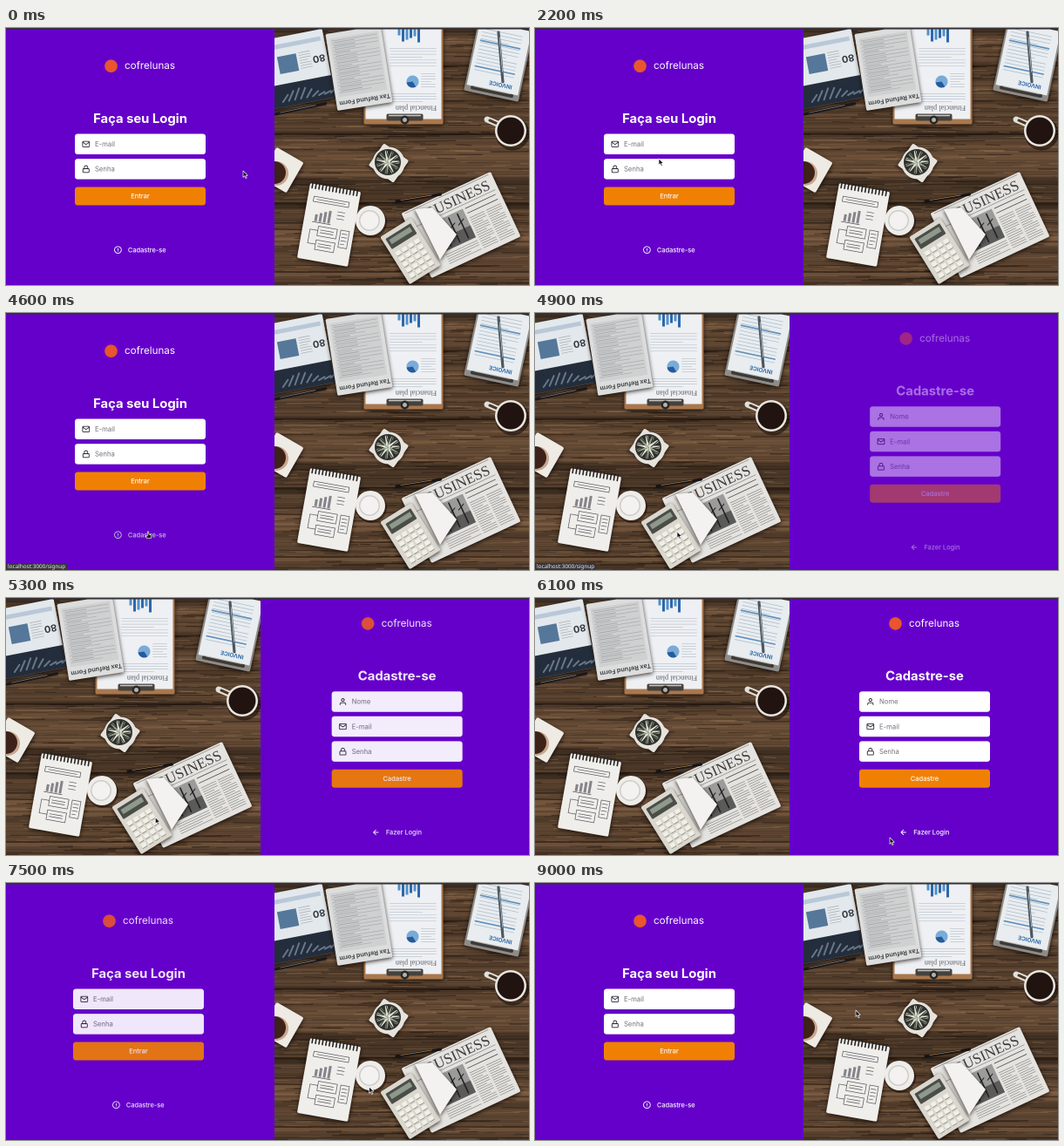
An HTML page with a canvas for the animation above (9200 ms loop, 600 px wide and 295 px high).

```html
<!DOCTYPE html>
<html lang="pt-BR">
<head>
<meta charset="utf-8">
<title>Login</title>
<style>
  html, body { margin: 0; width: 100%; height: 100%; overflow: hidden; background: #6500ca; }
  canvas { display: block; width: 100vw; height: 100vh; }
</style>
</head>
<body>
<canvas id="stage"></canvas>
<script>
const W = 600, H = 295, LOOP = 9200, STEP = 100;
const PURPLE = '#6500ca', ORANGE = '#f08003', INK = '#55545a', GREY = '#a9adb1';
const BRAND = 'cofrelunas';
const SIGNUP_AT = 4632, LOGIN_AT = 6865;
const SANS = 'Inter, "Open Sans", sans-serif';
const SERIF = '"Liberation Serif", serif';
const scale = Math.max(2, window.devicePixelRatio || 1);

function prepare(canvas) {
  canvas.width = W * scale;
  canvas.height = H * scale;
  const c = canvas.getContext('2d');
  c.scale(scale, scale);
  c.lineJoin = c.lineCap = 'round';
  return c;
}

function layer(draw) {
  const canvas = document.createElement('canvas');
  draw(prepare(canvas));
  return canvas;
}

// Drawing helpers
function line(c, x0, y0, x1, y1, color, width = .7) {
  c.beginPath();
  c.moveTo(x0, y0);
  c.lineTo(x1, y1);
  c.strokeStyle = color;
  c.lineWidth = width;
  c.stroke();
}

function disc(c, x, y, r, fill) {
  c.beginPath();
  c.arc(x, y, r, 0, 7);
  c.fillStyle = fill;
  c.fill();
}

function box(c, x, y, w, h, r, fill) {
  c.beginPath();
  c.roundRect(x, y, w, h, r);
  c.fillStyle = fill;
  c.fill();
}

function text(c, str, x, y, font, fill, align = 'left') {
  c.font = font;
  c.fillStyle = fill;
  c.textAlign = align;
  c.fillText(str, x, y);
}

function at(c, x, y, deg, draw) {
  c.save();
  c.translate(x, y);
  c.rotate(deg * Math.PI / 180);
  draw();
  c.restore();
}

function shadow(c) {
  c.shadowColor = 'rgba(15,8,4,.8)';
  c.shadowBlur = 5 * scale;
  c.shadowOffsetY = 1.5 * scale;
}

// A tilted card; its content is drawn from the top left corner
function card(c, x, y, w, h, deg, fill, draw) {
  at(c, x, y, deg, () => {
    c.translate(-w / 2, -h / 2);
    c.save();
    shadow(c);
    box(c, 0, 0, w, h, 2, fill);
    c.restore();
    draw();
  });
}

function rows(c, x, y, w, n, gap, color = GREY) {
  for (let i = 0; i < n; i++) line(c, x, y + i * gap, x + w * (i % 4 === 3 ? .7 : 1), y + i * gap, color);
}

function flipped(c, str, x, y, font, color) {
  at(c, x, y, 180, () => text(c, str, 0, 2, font, color, 'center'));
}

function pen(c, x, y, length, deg, color, shine) {
  at(c, x, y, deg, () => {
    line(c, 0, 0, length, 0, color, 3.2);
    line(c, length * .1, -.6, length * .8, -.6, shine);
  });
}

function random(seed) {
  return () => (seed = seed * 16807 % 2147483647) / 2147483647;
}

// Desk picture, laid out for the right half of the stage
function wood(c) {
  const rnd = random(77);
  let tone = 26;
  for (let y = 0; y < H; y++) {
    tone += (26 + 4 * Math.sin(y / 17) - tone) * .2 + (rnd() - .5) * 8;
    c.fillStyle = `hsl(27 31% ${tone}%)`;
    c.fillRect(308, y, 294, 1.5);
  }
  for (let i = 0; i < 650; i++) {
    const x = 290 + rnd() * 310, y = rnd() * H;
    const color = rnd() < .55 ? 'rgba(28,17,11,.45)' : 'rgba(172,132,94,.3)';
    line(c, x, y, x + 10 + rnd() * 55, y + rnd() * 2 - 1, color, .4 + rnd());
  }
  for (let y = 43; y < H; y += 79) line(c, 308, y, 602, y, 'rgba(24,14,9,.7)', 1.3);
}

function papers(c) {
  card(c, 330, 48, 82, 80, -11, '#e3e8ec', () => {
    box(c, 0, 54, 82, 26, 1, '#242d3b');
    for (let x = 22; x < 80; x += 7) line(c, x, 74, x + 7, 67 + 5 * Math.sin(x), '#66788a', 2);
    box(c, 22, 8, 56, 5, 0, '#b9c8d8');
    box(c, 25, 22, 22, 20, 0, '#55779a');
    rows(c, 50, 22, 13, 7, 3);
    flipped(c, '80', 72, 31, `700 11px ${SANS}`, '#343b45');
  });
  pen(c, 309, 99, 59, -12, '#18191c', '#868483');

  card(c, 456, 54, 91, 113, 0, '#a9774d', () => {
    box(c, 2, 0, 87, 107, 0, '#eef0f3');
    for (let i = 0; i < 6; i++) box(c, 39 + i * 4.5, 2, 3, 9 + i * 7 % 9, 0, i % 2 ? '#2e68ac' : '#5390ca');
    rows(c, 30, 26, 53, 7, 3.3, '#bfc8d1');
    rows(c, 66, 55, 16, 6, 3, '#bfc8d1');
    disc(c, 56, 64, 7, '#79abd9');
    c.beginPath();
    c.moveTo(56, 64);
    c.arc(56, 64, 7, 1, 3);
    c.fillStyle = '#255b9c';
    c.fill();
    rows(c, 30, 78, 53, 4, 3, '#bfc8d1');
    flipped(c, 'Financial plan', 60, 94, `8.3px ${SERIF}`, '#555960');
    box(c, 26, 101, 42, 8, 2, '#45423e');
    line(c, 29, 103, 65, 103, '#c9c7c1', 1.4);
    disc(c, 47, 108, 5, '#292827');
    disc(c, 47, 108, 2.5, '#b5b2aa');
  });

  card(c, 405, 46, 64, 89, -9, '#dcdddc', () => {
    box(c, 4, 6, 56, 68, 0, '#cfd0d0');
    rows(c, 6, 9, 52, 16, 4);
    rows(c, 8, 11, 24, 15, 4, '#96999b');
    flipped(c, 'Tax Refund Form', 33, 81, `700 7.2px ${SANS}`, '#46494c');
  });

  card(c, 565, 38, 64, 82, 12, '#8f8c88', () => {
    box(c, 2, 0, 60, 75, 0, '#e9edf0');
    rows(c, 7, 8, 46, 13, 4, '#aab9c8');
    for (const y of [22, 52]) line(c, 7, y, 53, y, '#5e8fbc', 1.6);
    flipped(c, 'INVOICE', 40, 67, `700 6.5px ${SANS}`, '#316ca8');
    line(c, 9, 77, 55, 77, '#3c3a38', 4);
    line(c, 11, 75, 53, 75, '#b5b3ae', 1);
  });
  pen(c, 565, 5, 57, 85, '#4c5861', '#c8d1d6');
}

function crockery(c) {
  line(c, 552, 105, 564, 110, '#e2dfd9', 7);
  line(c, 555, 106, 564, 110, '#4a3627', 3);
  disc(c, 581, 121, 19.5, 'rgba(20,10,6,.55)');
  disc(c, 579, 118, 18, '#eae7e1');
  disc(c, 579, 118, 15.5, '#21130f');

  card(c, 316, 163, 36, 40, 30, '#eeeae4', () => {});
  disc(c, 310, 167, 14, '#c9a68e');
  disc(c, 308, 166, 13, '#3c2219');

  card(c, 439, 155, 35, 31, 35, '#e6e3dd', () => {});
  disc(c, 439, 155, 18.5, '#e6e3dd');
  disc(c, 438, 154, 15, '#2f302b');
  for (let i = 0; i < 11; i++) {
    at(c, 438, 154, i * 360 / 11, () => {
      line(c, 2, 0, 12, 0, i % 2 ? '#9aa18f' : '#e2e2d6', 3);
      line(c, 3, 1.5, 13, 0, '#252c24', 1);
    });
  }
}

function notebook(c) {
  card(c, 370.5, 226, 59, 87, 10, '#efeeeb', () => {
    for (let x = 3; x < 58; x += 4) line(c, x, -2, x, 5, '#252423', 1.6);
    c.strokeStyle = INK;
    c.lineWidth = .7;
    c.strokeRect(7, 14, 41, 6);
    line(c, 11, 17, 44, 17, INK);
    line(c, 10, 43, 31, 43, INK);
    for (let i = 0; i < 4; i++) box(c, 12 + i * 5, 34 - i * 2.2, 3, 8 + i * 2.2, 0, '#85848a');
    rows(c, 37, 27, 8, 3, 4, INK);
    for (const y of [47, 63]) {
      c.strokeRect(18, y, 22, 11);
      rows(c, 21, y + 4, 15, 2, 3, INK);
      line(c, 9, y + 5, 18, y + 5, INK);
    }
    line(c, 9, 52, 9, 68, INK);
    c.strokeRect(44, 47, 10, 20);
    rows(c, 46, 51, 6, 4, 4, INK);
  });
  disc(c, 419, 223, 18, 'rgba(20,10,6,.5)');
  disc(c, 418, 221, 17, '#eeedea');
  disc(c, 417, 221, 12, '#cfcdca');
  disc(c, 417, 221, 10.5, '#f3f2f0');
}

function newspaper(c) {
  card(c, 522, 226, 113, 82, -25, '#e4e3df', () => {
    text(c, 'BUSINESS', 25, 18, `17px ${SERIF}`, '#3c3b3b');
    for (const y of [2, 21]) line(c, 4, y, 109, y, '#888683');
    box(c, 26, 25, 40, 36, 0, '#9b9b99');
    box(c, 26, 46, 40, 15, 0, '#5b5b5a');
    for (let x = 36; x < 62; x += 11) {
      line(c, x, 28, x, 58, '#222', 1.6);
      line(c, x - 4, 40, x + 4, 36, '#222', 1);
    }
    rows(c, 69, 26, 38, 2, 6, '#434240');
    for (const x of [69, 90]) rows(c, x, 38, 18, 15, 2.7, '#8d8c89');
    rows(c, 26, 65, 40, 5, 2.7, '#8d8c89');
  });
  pen(c, 448, 199, 51, -9, '#161516', '#b17d48');
  card(c, 464, 256, 42, 64, -32, '#d9d7ce', () => {
    box(c, 4, 5, 34, 14, 1, '#4b4d48');
    box(c, 7, 8, 28, 6, 0, '#8f988c');
    for (let i = 0; i < 20; i++) {
      const x = 5 + i % 4 * 8.4, y = 24 + Math.floor(i / 4) * 7.5;
      box(c, x, y + .8, 6.4, 5, 1, '#88867e');
      box(c, x, y, 6.4, 5, 1, '#f1efe6');
    }
  });
  c.save();
  shadow(c);
  c.beginPath();
  c.moveTo(469, 208);
  c.lineTo(489, 206);
  c.lineTo(517, 237);
  c.lineTo(498, 266);
  c.fillStyle = '#f3f2f0';
  c.fill();
  c.restore();
}

const photo = layer(c => {
  c.beginPath();
  c.rect(308, 0, 294, H);
  c.clip();
  for (const draw of [wood, papers, crockery, notebook, newspaper]) draw(c);
});

// Line icons on a 24 unit grid
const ICONS = {
  mail: 'M4 4h16a2 2 0 0 1 2 2v12a2 2 0 0 1-2 2H4a2 2 0 0 1-2-2V6a2 2 0 0 1 2-2zM22 6l-10 7L2 6',
  lock: 'M5 11h14a2 2 0 0 1 2 2v7a2 2 0 0 1-2 2H5a2 2 0 0 1-2-2v-7a2 2 0 0 1 2-2zM7 11V7a5 5 0 0 1 10 0v4',
  user: 'M20 21v-2a4 4 0 0 0-4-4H8a4 4 0 0 0-4 4v2M16 7a4 4 0 1 1-8 0a4 4 0 1 1 8 0',
  info: 'M22 12a10 10 0 1 1-20 0a10 10 0 1 1 20 0M12 8v5M12 16v.1',
  back: 'M19 12H5M12 19l-7-7 7-7'
};

function icon(c, name, x, y, color) {
  c.save();
  c.translate(x, y);
  c.scale(.39, .39);
  c.translate(-12, -12);
  c.strokeStyle = color;
  c.lineWidth = 2.3;
  c.stroke(new Path2D(ICONS[name]));
  c.restore();
}

const FIELD_GAP = 28.6, FORM_W = 150, LINK_FONT = `500 7.4px ${SANS}`;

function form(c, page, hover) {
  const { x, mid, top, fields, buttonY, linkX, linkY } = page;
  disc(c, x + 41.5, top, 7.3, '#e7562f');
  text(c, BRAND, x + 57, top + 3.4, `11.6px ${SANS}`, '#fff');
  text(c, page.title, mid, top + 65.3, `700 14.8px ${SANS}`, '#fff', 'center');
  fields.forEach(([name, label], i) => {
    const y = page.fieldY + i * FIELD_GAP;
    box(c, x, y, FORM_W, 23.5, 3, '#fff');
    icon(c, name, x + 12.8, y + 11.8, '#2b2536');
    text(c, label, x + 23, y + 14.5, `7.7px ${SANS}`, '#72707a');
  });
  box(c, x, buttonY, FORM_W, 21, 3, ORANGE);
  text(c, page.action, mid, buttonY + 13.2, `500 7.5px ${SANS}`, '#fff', 'center');
  const color = hover ? '#cbc4d2' : '#fff';
  icon(c, page.linkIcon, linkX, linkY, color);
  text(c, page.link, linkX + 11.5, linkY + 2.7, LINK_FONT, color);
}

// The form is centred, so each extra field pushes both ends outwards
function makePage(page) {
  const spread = page.fields.length * FIELD_GAP / 2;
  page.mid = page.x + FORM_W / 2;
  page.top = 72.3 - spread;
  page.fieldY = page.top + 77.8;
  page.buttonY = 153.9 + spread;
  page.linkY = page.buttonY + 72.2;
  const c = document.createElement('canvas').getContext('2d');
  c.font = LINK_FONT;
  page.linkW = c.measureText(page.link).width + 15.5;
  page.linkX = page.mid - page.linkW / 2 + 4;
  page.views = [false, true].map(hover => layer(c => form(c, page, hover)));
  return page;
}

const mail = ['mail', 'E-mail'], lock = ['lock', 'Senha'];
const login = makePage({
  x: 79, title: 'Faça seu Login', fields: [mail, lock], action: 'Entrar',
  link: 'Cadastre-se', linkIcon: 'info', url: 'localhost:3000/signup',
  panelX: 0, panelW: 308, photoX: 0, from: -22
});
const signup = makePage({
  x: 372, title: 'Cadastre-se', fields: [['user', 'Nome'], mail, lock], action: 'Cadastre',
  link: 'Fazer Login', linkIcon: 'back', url: 'localhost:3000',
  panelX: 293.5, panelW: 307, photoX: -308, from: 22
});

// Motion
const clamp = v => Math.min(1, Math.max(0, v));
const ramp = (t, a, b) => clamp((t - a) / (b - a));
const smooth = p => p * p * (3 - 2 * p);

// Same curve as the CSS "ease" keyword
function ease(p) {
  const bez = (u, a, b) => 3 * u * (1 - u) ** 2 * a + 3 * u * u * (1 - u) * b + u ** 3;
  let lo = 0, hi = 1;
  for (let i = 0; i < 24; i++) {
    const u = (lo + hi) / 2;
    if (bez(u, .25, .25) < p) lo = u; else hi = u;
  }
  return p >= 1 ? 1 : bez(lo, .1, 1);
}

// Pointer moves: start, end, x, y
const MOVES = [
  [800, 1500, 205, 148], [1700, 2200, 142, 150], [2400, 3100, 143, 172], [3200, 4200, 163, 251],
  [5200, 6100, 407, 275], [6200, 6800, 437, 272], [7200, 7900, 385, 175], [8100, 8300, 368, 146]
];

function pointer(t) {
  return MOVES.reduce(([px, py], [start, end, x, y]) => {
    const s = smooth(ramp(t, start, end));
    return [px + (x - px) * s, py + (y - py) * s];
  }, [272, 164]);
}

function cursorKind(page, x, y) {
  const inside = (l, t, w, h) => x >= l && x <= l + w && y >= t && y <= t + h;
  if (inside(page.linkX - 4, page.linkY - 7, page.linkW, 14)) return 'link';
  if (inside(page.x, page.buttonY, FORM_W, 21)) return 'hand';
  if (page.fields.some((f, i) => inside(page.x + 22, page.fieldY + i * FIELD_GAP, 124, 23.5))) return 'text';
  return 'arrow';
}

const ARROW = new Path2D('M0 0V7.4L1.7 5.8L3 8.6L4.2 8L3 5.4L5.3 5.2Z');
const HAND = new Path2D('M-.7 0H.7L.8 3L3.6 3.8L3.3 7.5L-1.2 7.8L-3 4.8L-.8 5Z');
const BEAM = new Path2D('M-1.5 -4H1.5M0 -4V4M-1.5 4H1.5');

function drawCursor(c, kind, x, y) {
  const beam = kind === 'text';
  const shape = beam ? BEAM : kind === 'arrow' ? ARROW : HAND;
  c.save();
  c.translate(x, y);
  c.fillStyle = '#17131c';
  c.strokeStyle = beam ? '#222' : '#eee';
  c.lineWidth = .7;
  if (!beam) c.fill(shape);
  c.stroke(shape);
  c.restore();
}

function drawStatus(c, url, alpha) {
  if (alpha <= 0) return;
  const font = '6.4px "Noto Sans", sans-serif';
  c.save();
  c.globalAlpha = alpha;
  c.font = font;
  box(c, 0, 287, c.measureText(url).width + 4, 9, [0, 2, 0, 0], '#37353a');
  text(c, url, 2, 293, font, '#f0eef2');
  c.restore();
}

const ctx = prepare(document.getElementById('stage'));

function render(t) {
  const page = t >= SIGNUP_AT && t < LOGIN_AT ? signup : login;
  const start = t >= LOGIN_AT ? LOGIN_AT : page === signup ? SIGNUP_AT : -1000;
  const shown = ease(clamp((t - start) / 1000));
  const [x, y] = pointer(t);
  const kind = cursorKind(page, x, y);

  ctx.fillStyle = PURPLE;
  ctx.fillRect(0, 0, W, H);
  ctx.drawImage(photo, page.photoX, 0, W, H);
  ctx.fillRect(page.panelX, 0, page.panelW, H);
  ctx.globalAlpha = shown;
  ctx.drawImage(page.views[kind === 'link' ? 1 : 0], page.from * (1 - shown), 0, W, H);
  ctx.globalAlpha = 1;
  ctx.fillStyle = '#343038';
  ctx.fillRect(0, 0, W, 1.5);

  drawStatus(ctx, login.url, ramp(t, 4000, 4200) * (1 - ramp(t, 4900, 5200)));
  drawStatus(ctx, signup.url, ramp(t, 6300, 6500) * (1 - ramp(t, 6700, 6920)));
  drawCursor(ctx, kind, x, y);
}

function tick(now) {
  render(Math.floor(now % LOOP / STEP) * STEP);
  requestAnimationFrame(tick);
}
render(0);
requestAnimationFrame(tick);
</script>
</body>
</html>
```
